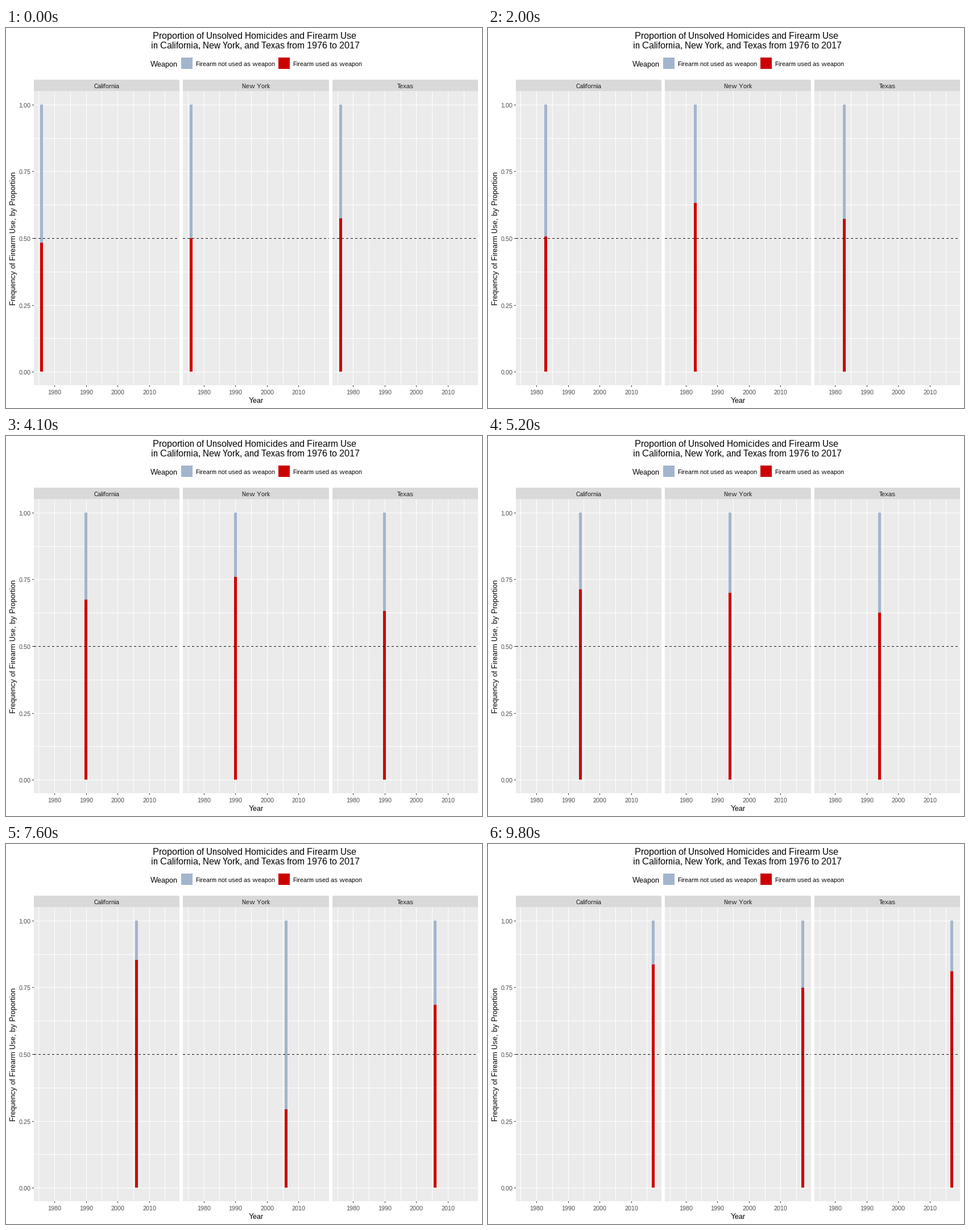
Write a matplotlib script that moves like this. It is 837x669 px and loops after 10000 ms.

```python
import math

import matplotlib.pyplot as plt
import numpy as np
from matplotlib.animation import FuncAnimation
from matplotlib.patches import Rectangle

W, H, DPI = 837, 669, 64
PT = 72 / DPI  # points per pixel
FRAMES, INTERVAL = 100, 100

STATES = ["California", "New York", "Texas"]
PANELS = [(49, 305), (311, 568), (574, 830)]
PANEL_STEP, YEAR_STEP = 262.65, 5.554
TOP, BOTTOM = 111, 629
BAR_TOP, BAR_BOTTOM, BAR_WIDTH = 135, 605, 5
BLUE, RED = "#A2B5CD", "#CD0000"

KEY_YEARS = [1976, 1983, 1990, 1999, 2006, 2013, 2017]
SHARES = [
    [0.484, 0.508, 0.676, 0.762, 0.855, 0.838, 0.838],
    [0.500, 0.634, 0.760, 0.629, 0.295, 0.780, 0.750],
    [0.576, 0.573, 0.634, 0.616, 0.686, 0.727, 0.812],
]

# Full hinting on whole pixel sizes gives crisp screen text.
plt.rcParams.update({"font.family": "Liberation Sans",
                     "text.hinting": "native",
                     "text.hinting_factor": 1})
fig = plt.figure(figsize=(W / DPI, H / DPI), dpi=DPI, facecolor="white")
ax = fig.add_axes([0, 0, 1, 1])
ax.set(xlim=(0, W), ylim=(H, 0))
ax.axis("off")


def rect(x0, y0, x1, y1, color, z=1):
    patch = Rectangle((x0, y0), x1 - x0, y1 - y0, fc=color, lw=0, zorder=z)
    return ax.add_patch(patch)


def text(x, y, s, px, color="black", ha="center", **kw):
    ax.text(x, y, s, fontsize=px * PT, color=color, ha=ha, va="baseline", **kw)


def year_x(year, panel):
    return 62.82 + (year - 1976) * YEAR_STEP + panel * PANEL_STEP


def share_y(share):
    return BAR_BOTTOM - (BAR_BOTTOM - BAR_TOP) * share


def draw_header():
    text(437.3, 19, "Proportion of Unsolved Homicides and Firearm Use", 16)
    text(438.8, 36, "in California, New York, and Texas from 1976 to 2017", 16)
    text(253.5, 68, "Weapon", 13, ha="left")
    for x, color, label in [(308, BLUE, "Firearm not used as weapon"),
                            (479, RED, "Firearm used as weapon")]:
        rect(x, 52, x + 20, 72, color)
        text(x + 26, 67, label, 11, ha="left")


def draw_panel(i):
    left, right = PANELS[i]
    rect(left, 91, right, TOP, "#D9D9D9")
    rect(left, TOP, right, BOTTOM, "#EBEBEB")
    text((left + right) / 2, 106, STATES[i], 11, "#1A1A1A")
    for eighth in range(9):
        y = round(share_y(eighth / 8))
        rect(left, y, right, y + 1, "white", 2)
    for year in range(1975, 2016, 5):
        x = round(year_x(year, i))
        rect(x, TOP, x + 1, BOTTOM, "white", 2)
        if year % 10 == 0:
            rect(x, BOTTOM, x + 1, BOTTOM + 3, "#333333", 2)
            text(x + 0.5, 645, str(year), 11, "#4D4D4D")
    for x in range(left, right, 8):
        rect(x, 370, min(x + 4, right), 371, "black", 5)


def draw_axes():
    for quarter in range(5):
        y = round(share_y(quarter / 4))
        rect(46, y, 49, y + 1, "#333333", 2)
        text(43.5, y + 5, f"{quarter / 4:.2f}", 11, "#4D4D4D", ha="right")
    text(439.5, 660, "Year", 13)
    text(17.5, 370.5, "Frequency of Firearm Use, by Proportion", 13,
         rotation=90, rotation_mode="anchor")


draw_header()
for panel in range(3):
    draw_panel(panel)
draw_axes()

bars = [(rect(0, BAR_TOP, 1, BAR_BOTTOM, BLUE, 3),
         rect(0, BAR_TOP, 1, BAR_BOTTOM, RED, 4)) for _ in STATES]


def year_at(ms):
    # Years last 300 ms in the first half of the loop and 200 ms in the second.
    if ms < 5000:
        return 1976 + (ms + 100) // 300
    return 1993 + (ms - 5000) // 200


def update(frame):
    year = year_at(frame * INTERVAL)
    for i, (blue, red) in enumerate(bars):
        left = round(year_x(year, i) - BAR_WIDTH / 2)
        split = math.ceil(share_y(np.interp(year, KEY_YEARS, SHARES[i])))
        blue.set_bounds(left, BAR_TOP, BAR_WIDTH, split - BAR_TOP)
        red.set_bounds(left, split, BAR_WIDTH, BAR_BOTTOM - split)
    return [patch for pair in bars for patch in pair]


anim = FuncAnimation(fig, update, frames=FRAMES, interval=INTERVAL,
                     repeat=True, repeat_delay=0, blit=False)
plt.show()
```
